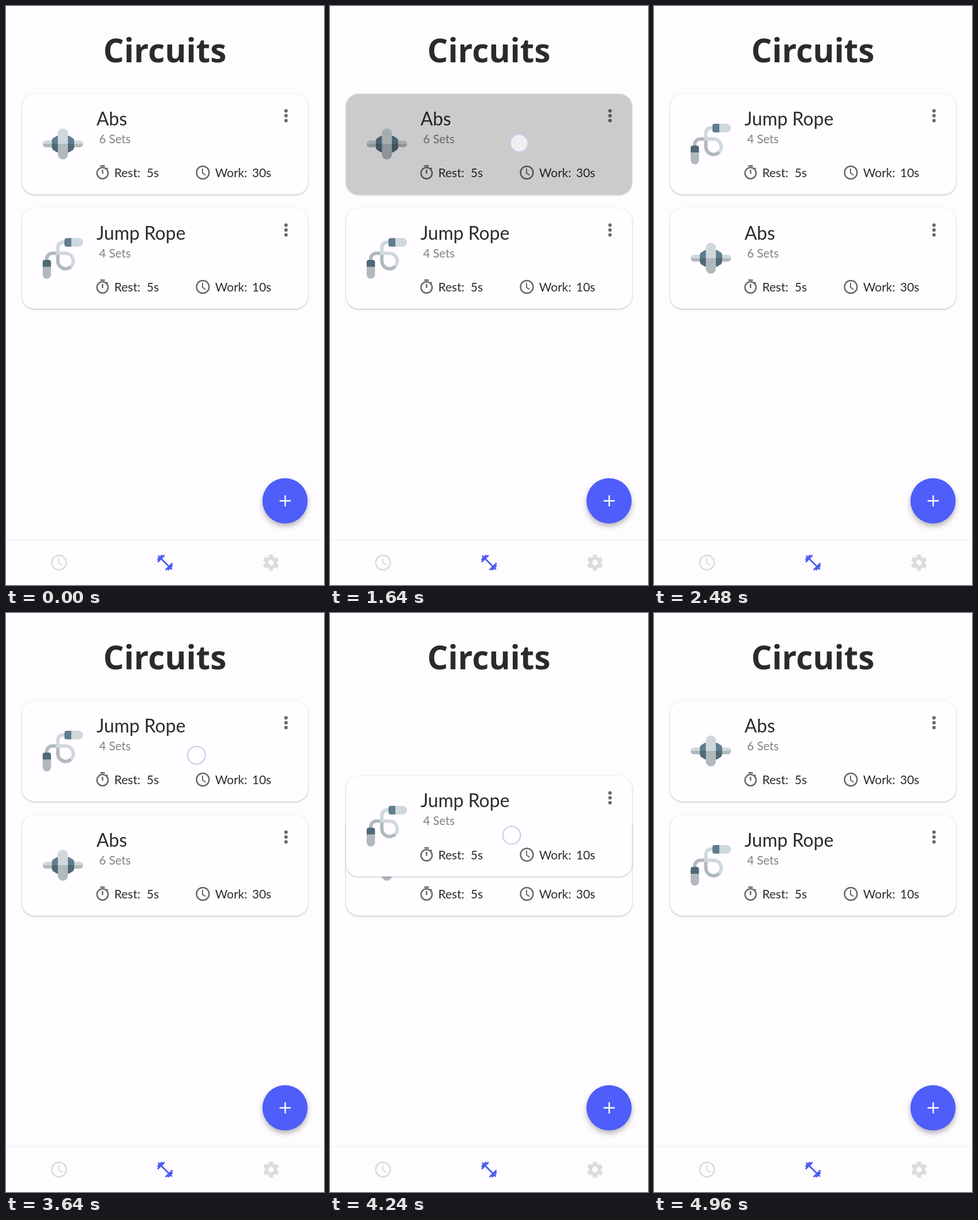
An HTML page for the animation above (6000 ms loop, 555 by 1008 pixels).

```html
<!DOCTYPE html>
<html lang="en">
<head>
<meta charset="utf-8">
<title>Circuits</title>
<style>
  html, body { margin: 0; height: 100%; overflow: hidden; background: #fefcff; }
  svg { display: block; width: 100vw; height: 100vh; font-family: Lato, sans-serif; fill: #2b2a2d; }
  .title { font: bold 56.8px "Open Sans", "Noto Sans", sans-serif; }
  .name { font-size: 32px; }
  .sets { font-size: 20.5px; fill: #838185; }
  .info { font-size: 21px; }
  .panel { fill: #fffdff; filter: drop-shadow(0 1px 1.4px rgba(0, 0, 0, .28)); }
  .line { fill: none; stroke: #69676a; stroke-width: 2.5; }
  .dots { fill: #69676a; }
  .light { fill: #cfd8dd; }
  .grey { fill: #b1b9be; }
  .steel { fill: #5f7d8e; }
  .dark { fill: #4f6976; }
  .rope { fill: none; stroke-width: 6; }
  .fab { fill: #4f5dfb; filter: drop-shadow(0 5px 5px rgba(0, 0, 0, .28)); }
  .idle { fill: #dddbde; stroke: #dddbde; }
  .active { fill: #4d5cf0; }
  .ripple { fill: #000; }
  .touch { fill: rgba(255, 255, 255, .7); stroke: #c6caea; stroke-width: 2; }
</style>
</head>
<body>
<svg viewBox="0 0 555 1008">
  <defs>
    <clipPath id="card"><rect x="28" width="499" height="175" rx="22"/></clipPath>
    <clipPath id="upper"><rect x="60" y="50" width="80" height="37"/></clipPath>
  </defs>
  <text class="title" x="277.3" y="98" text-anchor="middle">Circuits</text>
  <g id="cards"></g>

  <circle class="fab" cx="487" cy="861.5" r="39.5"/>
  <path d="M477.5 861.5h19.600M487.300 851.700v19.600" stroke="#fff" stroke-width="2.4"/>

  <path d="M0 929h555" stroke="#f5f3f6" stroke-width="2"/>
  <g class="idle" transform="translate(92.5 969)" stroke-width="2.7">
    <circle r="12.7" fill="none"/>
    <path d="M-.5-7.5V.5L6 4.5" fill="none" stroke-width="2.2"/>
  </g>
  <path class="active" transform="translate(260.800 952.200) scale(1.4)"
    d="M20.57 14.86L22 13.43 20.57 12 17 15.57 8.43 7 12 3.43 10.57 2 9.14 3.43 7.71 2 5.57 4.14 4.14 2.71 2.71 4.14 4.14 5.57 2 7.71 3.43 9.14 2 10.57 3.43 12 7 8.43 15.57 17 12 20.57 13.43 22 14.86 20.57 16.29 22 18.43 19.86 19.86 21.29 21.29 19.86 19.86 18.43 22 16.29z"/>
  <g class="idle" transform="translate(462.5 969)">
    <g id="teeth" stroke-width="7.5"></g>
    <circle r="10.6" stroke="none"/>
    <circle r="4.9" fill="#fefcff" stroke="none"/>
  </g>
  <circle id="touch" class="touch" r="15.4"/>
</svg>
<script>
const LOOP = 6000, TOP = 153, BOTTOM = 352, TOUCH_LAG = 5;
const $ = id => document.getElementById(id);

const wheelShape = (bar, body) => `
  <rect class="${bar}" x="64" y="81.5" width="70.5" height="11.5" rx="5.7"/>
  <rect class="${body}" x="80" y="75.5" width="39" height="24" rx="7"/>
  <rect class="${body}" x="84" y="73" width="31" height="29" rx="7"/>
  <rect class="${bar}" x="90.5" y="60.5" width="17.5" height="53.5" rx="8.7"/>`;
const wheel = `${wheelShape('grey', 'dark')}
  <g clip-path="url(#upper)">${wheelShape('light', 'steel')}</g>`;

const rope = `
  <path class="rope" stroke="#b1b9be" d="M71 91V88.5a10 10 0 0 1 10-10H91M90.5 78V92a13.5 13.5 0 0 0 23 9.5"/>
  <path class="rope" stroke="#cfd8dd" d="M103 59h-2q-10.5 0-10.5 11v8.5H104a13.5 13.5 0 0 1 9.5 23"/>
  <path class="steel" d="M114 52h-8q-4 0-4 4v7q0 4 4 4h8z"/>
  <path class="light" d="M114 52h13a7.5 7.5 0 0 1 0 15h-13z"/>
  <path class="dark" d="M64 102v-8q0-4 4-4h6.5q4 0 4 4v8z"/>
  <path class="grey" d="M64 102h14.5v13.5a7.2 7.2 0 0 1-14.5 0z"/>`;

function addCard(name, sets, work, picture) {
  const card = document.createElementNS('http://www.w3.org/2000/svg', 'g');
  card.innerHTML = `
    <rect class="panel" x="28" width="499" height="175" rx="22"/>
    ${picture}
    <text class="name" x="158" y="54.5">${name}</text>
    <text class="sets" x="162.5" y="85.7">${sets} Sets</text>
    <g class="dots">${[29.5, 38, 46.5].map(y => `<circle cx="488.7" cy="${y}" r="3"/>`).join('')}</g>
    <g class="line">
      <circle cx="168.5" cy="138" r="9.7"/>
      <path d="M164.5 125.3h8M168.5 132v7M175.5 131l2-2"/>
      <circle cx="343.5" cy="137" r="11"/>
      <path d="M343 130v8l5.5 3.5" stroke-width="2"/>
    </g>
    <g class="info">
      <text x="189" y="145">Rest:</text><text x="245.5" y="145">5s</text>
      <text x="365" y="145">Work:</text><text x="429.5" y="145">${work}s</text>
    </g>
    <g clip-path="url(#card)"><circle class="ripple"/></g>`;
  $('cards').append(card);
  return card;
}

const cards = [addCard('Abs', 6, 30, wheel), addCard('Jump Rope', 4, 10, rope)];
$('teeth').innerHTML = [0, 60, 120].map(a => `<path d="M0-13.8V13.8" transform="rotate(${a})"/>`).join('');

// Each drag: press, long-press pick-up, release, neighbour swap, settled, touch mark gone.
const drags = [
  { card: 0, press: 1200, lift: 1800, drop: 2124, swap: 2012, rest: 2400, gone: 2480,
    reach: 321, path: [[331, 238], [330, 239], [323, 537]] },
  { card: 1, press: 3640, lift: 4044, drop: 4500, swap: 4320, rest: 4800, gone: 4880,
    reach: 328, path: [[332.5, 247.5], [325, 263], [304, 587]] },
];

const progress = (t, from, to) => Math.min(1, Math.max(0, (t - from) / (to - from)));
const smooth = x => x * x * (3 - 2 * x);
const easeOut = x => 1 - (1 - x) ** 3;
const mix = (a, b, x) => a + (b - a) * x;

function draw(now) {
  const t = now % LOOP;
  const tops = [TOP, BOTTOM];
  const touch = $('touch');
  touch.style.display = 'none';
  cards.forEach(card => card.querySelector('.ripple').setAttribute('opacity', 0));

  for (const d of drags) {
    if (t < d.press) continue;
    const moved = time => smooth(progress(time, d.lift, d.drop));
    tops[d.card] = mix(TOP + d.reach * moved(t), BOTTOM, easeOut(progress(t, d.drop, d.rest)));
    tops[1 - d.card] = mix(BOTTOM, TOP, easeOut(progress(t, d.swap, d.swap + 340)));
    if (t >= d.gone) continue;

    if ($('cards').lastChild !== cards[d.card]) $('cards').append(cards[d.card]);
    const [a, b, c] = d.path, drift = progress(t, d.press, d.lift);
    const [x, y] = [0, 1].map(i => mix(mix(a[i], b[i], drift), c[i], moved(t - TOUCH_LAG)));
    touch.style.display = '';
    touch.setAttribute('transform', `translate(${x} ${y})`);

    const ripple = cards[d.card].querySelector('.ripple');
    const grow = progress(t, d.press + 80, d.press + 360);
    const fade = progress(t, d.lift - 80, d.lift + 40);
    ripple.setAttribute('cx', a[0]);
    ripple.setAttribute('cy', a[1] - TOP);
    ripple.setAttribute('r', 330 * easeOut(grow));
    ripple.setAttribute('opacity', 0.2 * Math.min(1, grow * 3) * (1 - fade));
  }
  cards.forEach((card, i) => card.setAttribute('transform', `translate(0 ${tops[i]})`));
  requestAnimationFrame(draw);
}
requestAnimationFrame(draw);
</script>
</body>
</html>
```
